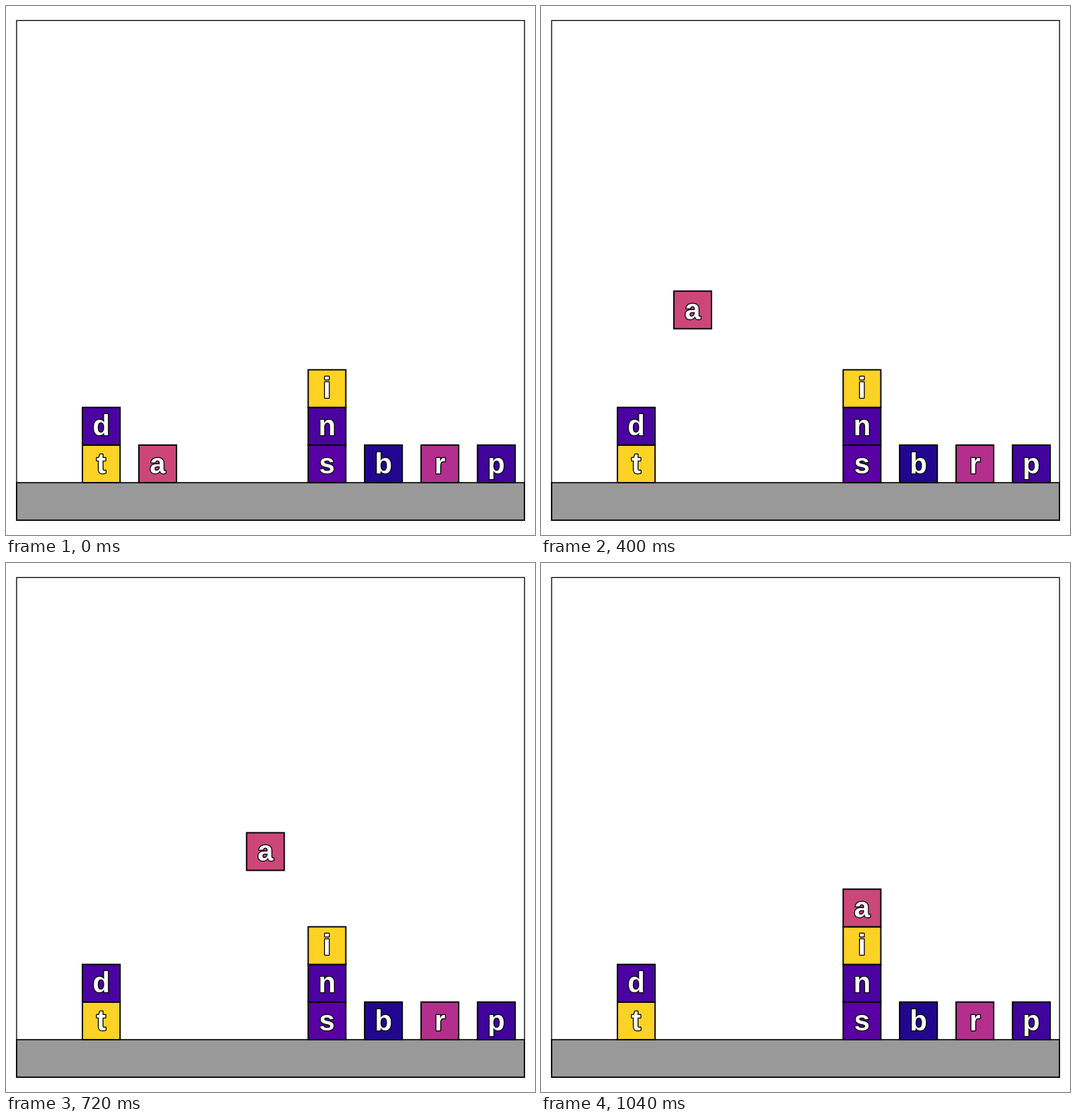
These frames come from a looping animation (748x748 px, 1080 ms). An HTML page:

```html
<!DOCTYPE html>
<html lang="en">
<head>
<meta charset="utf-8">
<title>Moving a block</title>
<style>
  html, body { margin: 0; width: 100%; height: 100%; overflow: hidden; background: #fff; }
  svg { display: block; width: 748px; height: 748px; }
  rect { stroke: #000; stroke-width: 1.9; }
  text {
    font: bold 40px "Liberation Sans", Arial, sans-serif;
    text-anchor: middle;
    fill: #fff;
    stroke: #000;
    stroke-width: 2.6;
    stroke-linejoin: round;
    paint-order: stroke;
  }
  .frame { fill: none; stroke-width: 1.3; }
</style>
</head>
<body>
<svg id="stage" viewBox="0 0 748 748">
  <rect x="15" y="674" width="718.2" height="53.2" fill="#999" style="stroke-width:1.6"/>
</svg>
<script>
const SIZE = 53.2, PITCH = SIZE * 1.5, LEFT = 108.1, GROUND = 674;
const STEP_MS = 40, STEPS = 27;
const stage = document.getElementById('stage');

function add(parent, tag, attrs) {
  const el = document.createElementNS('http://www.w3.org/2000/svg', tag);
  for (const key in attrs) el.setAttribute(key, attrs[key]);
  return parent.appendChild(el);
}

// Column and level count in block slots from the bottom left.
function place(block, column, level) {
  const x = LEFT + column * PITCH, y = GROUND - (level + 1) * SIZE;
  block.setAttribute('transform', `translate(${x} ${y})`);
}

function addBlock(letter, fill, column, level) {
  const block = add(stage, 'g', {});
  add(block, 'rect', { width: SIZE, height: SIZE, fill });
  add(block, 'text', { x: SIZE / 2, y: SIZE / 2 + 13.3 }).textContent = letter;
  place(block, column, level);
  return block;
}

addBlock('t', '#fcd225', 0, 0);
addBlock('d', '#4b03a1', 0, 1);
addBlock('s', '#5901a5', 4, 0);
addBlock('n', '#4c02a1', 4, 1);
addBlock('i', '#fcd225', 4, 2);
addBlock('b', '#220690', 5, 0);
addBlock('r', '#b42e8d', 6, 0);
addBlock('p', '#41049d', 7, 0);
const mover = addBlock('a', '#cc4778', 1, 0);
add(stage, 'rect', { class: 'frame', x: 15, y: 20.5, width: 718.2, height: 706.7 });

const progress = (step, start, count) => Math.min(1, Math.max(0, (step - start) / count));

// Lift, carry right, then lower onto the stack.
function draw(now) {
  const step = Math.floor(now / STEP_MS) % STEPS;
  const column = 1 + 3 * progress(step, 0 + 11, 11);
  const level = 4.5 * progress(step, 0, 11) - 1.5 * progress(step, 22, 4);
  place(mover, column, level);
  requestAnimationFrame(() => draw(performance.now() - start));
}

const start = performance.now();
draw(0);
</script>
</body>
</html>
```
